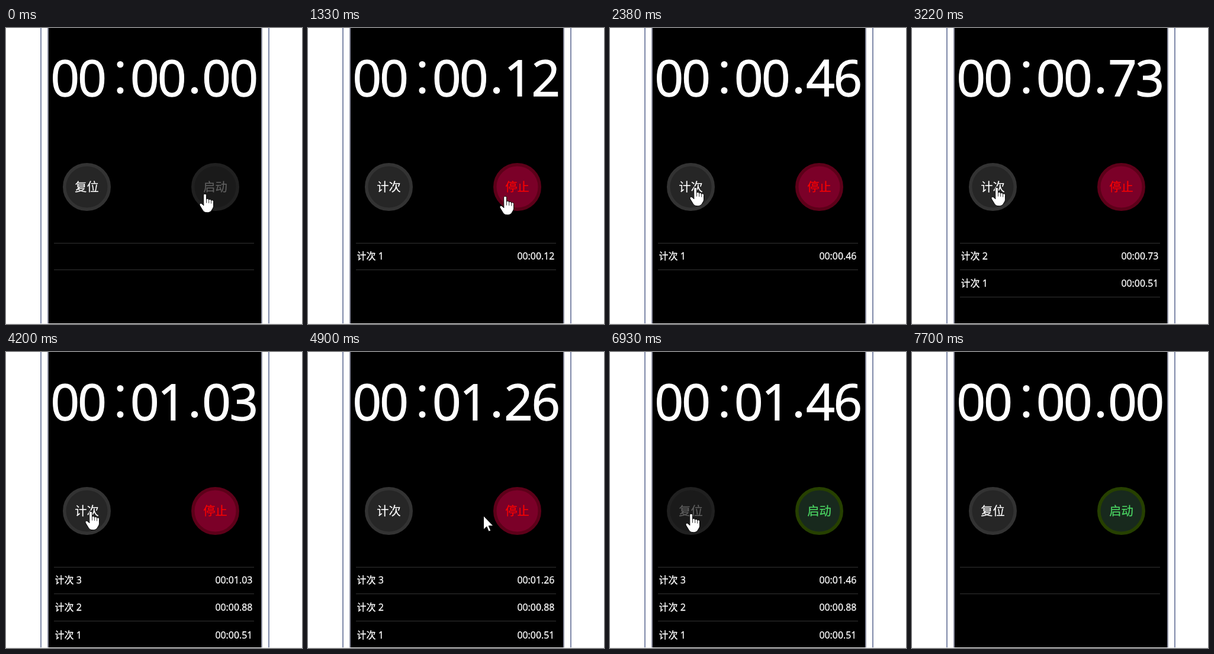
An HTML page for the animation above (8260 ms loop, 500x500 px).

```html
<!DOCTYPE html>
<html lang="zh">
<head>
<meta charset="utf-8">
<title>Stopwatch</title>
<style>
  html, body { margin: 0; width: 100%; height: 100%; overflow: hidden; background: #fff; }
  svg { display: block; width: 500px; height: 500px; }
  text {
    font-family: "Open Sans", "Noto Sans CJK SC", "Noto Sans CJK", sans-serif;
    color: #fff; fill: currentColor; stroke: currentColor; stroke-width: .35;
  }
  .digit { font-size: 85px; text-anchor: middle; stroke-width: 1.3; }
  .label { font-size: 20.3px; text-anchor: middle; stroke-width: .2; }
  .lap { font-size: 16px; }
  .time { font-size: 15.9px; text-anchor: end; }
  .rule { fill: #333; }
  .cursor { fill: #fff; stroke: #000; stroke-width: 1; stroke-linejoin: round; stroke-linecap: round; }
</style>
</head>
<body>
<svg id="stage" viewBox="0 0 500 500">
  <rect width="500" height="500" fill="#fff"/>
  <g fill="#7f89a9">
    <rect x="58" width="2" height="500"/>
    <rect x="443" width="2" height="500"/>
  </g>
  <rect x="70" width="363" height="500" fill="#8a8c9e"/>
  <rect x="72" width="359" height="500" fill="#000"/>
  <rect y="499" width="500" height="1" fill="#f0f0f0"/>
  <g fill="#fff">
    <circle cx="193" cy="61.5" r="5.5"/>
    <circle cx="193" cy="105.5" r="5.5"/>
    <circle cx="318.5" cy="105.5" r="5.7"/>
  </g>
  <rect class="rule" x="81" y="363" width="338" height="1"/>
  <rect class="rule" x="81" y="408" width="338" height="1"/>
  <g id="ui"></g>
  <g id="pointer" class="cursor">
    <g id="hand" transform="translate(-.8 -.8)">
      <path d="M-2.6 2.4C-2.6-.9 2.3-.9 2.3 2.4V9.2C3.2 7.6 6.2 7.8 6.5 10C7.6 8.5 10.2 9 10.4 11.2C11.8 9.9 14.4 10.7 14.4 13.4V20C14.4 23.5 12.2 25.6 11.2 27.6C9.6 31 6 31.5 3 31.5C-.6 31.5-2.6 29.8-4.2 27.2L-8.7 19.8C-10.3 17.2-7.6 14.8-5.2 16.8L-2.6 19.4Z"/>
      <path d="M2.3 9V15M6.5 10V15.4M10.4 11.2V16" fill="none" stroke-width=".8"/>
    </g>
    <path id="arrow" d="M0 0V23L5.3 18L8.8 26.2L12.3 24.7L8.8 16.8H16.3Z"/>
  </g>
</svg>
<script>
const LOOP = 8260, STEP = 70;
const START = 980, STOP = 5530, RESET = 7070, EXIT = 7700;
const LAPS = [[2590, 51], [3780, 88]];
const LEFT_PRESS = [[2450, 2590], [3640, 3780], [6930, 7070]];
const RIGHT_PRESS = [[0, 910], [5390, 5530]];

// time, hundredths
const CLOCK = [[960, 0], [1330, 12], [2380, 46], [3220, 73], [3360, 77], [3430, 77], [4200, 103], [5530, 146]];
// time, x, y of the fingertip
const PATH = [
  [0, 337, 281], [630, 337, 281], [910, 334, 285], [1470, 334, 285],
  [2310, 145, 270], [2450, 145, 270], [2590, 144, 270], [4270, 144, 270],
  [5180, 341, 279], [5530, 340, 278], [5950, 142, 280], [6160, 138, 274],
  [7280, 138, 274], [7700, 385, 510]
];
// fill, border, text
const LOOK = {
  grey: ["#262626", "#333333", "#ffffff"],
  red: ["#7b0028", "#5d0019", "#ff0000"],
  green: ["#18291d", "#264000", "#4cd964"],
  pressed: ["#1a1a1a", "#202020", "#606060"]
};

const ui = document.getElementById("ui");
const pointer = document.getElementById("pointer");
const hand = document.getElementById("hand");
const arrow = document.getElementById("arrow");

function add(tag, attrs) {
  const node = document.createElementNS("http://www.w3.org/2000/svg", tag);
  for (const key in attrs) node.setAttribute(key, attrs[key]);
  return ui.appendChild(node);
}
const show = (node, on) => node.setAttribute("visibility", on ? "visible" : "hidden");

const digits = [99.7, 145.5, 234.3, 280.2, 355.6, 401.9].map(x => add("text", { class: "digit", x, y: 114.7 }));

function makeButton(cx) {
  const cy = 268.5;
  return {
    cx, cy,
    disc: add("circle", { cx, cy, r: 37.75, "stroke-width": 5.5 }),
    label: add("text", { class: "label", x: cx, y: 276 })
  };
}
const left = makeButton(136.5), right = makeButton(353.5);

const rows = [0, 1, 2].map(i => {
  const y = 391 + 46.4 * i;
  return {
    name: add("text", { class: "lap", x: 82.5, y }),
    time: add("text", { class: "time", x: 416.4, y }),
    rule: add("rect", { class: "rule", x: 81, y: [408, 454, 500][i], width: 338, height: 1 })
  };
});

function sample(keys, t, ease = p => p) {
  if (t <= keys[0][0]) return keys[0].slice(1);
  const i = keys.findIndex(k => k[0] > t);
  if (i < 0) return keys[keys.length - 1].slice(1);
  const a = keys[i - 1], b = keys[i];
  const p = ease((t - a[0]) / (b[0] - a[0]));
  return a.slice(1).map((v, j) => v + (b[j + 1] - v) * p);
}
const smooth = p => p * p * (3 - 2 * p);
const within = (spans, t) => spans.some(([a, b]) => t >= a && t < b);
const pad = n => String(n).padStart(2, "0");
const format = cs => `${pad(Math.floor(cs / 6000))}:${pad(Math.floor(cs / 100) % 60)}.${pad(cs % 100)}`;

function paint(button, text, look) {
  const [fill, border, ink] = LOOK[look];
  button.disc.setAttribute("fill", fill);
  button.disc.setAttribute("stroke", border);
  button.label.style.color = ink;
  button.label.textContent = text;
}

function render(t) {
  const running = t >= START && t < STOP;
  const active = t >= START && t < RESET;
  const cs = active ? Math.round(sample(CLOCK, t)[0]) : 0;

  const chars = format(cs).replace(/\D/g, "");
  digits.forEach((d, i) => d.textContent = chars[i]);

  paint(left, running ? "计次" : "复位", within(LEFT_PRESS, t) ? "pressed" : "grey");
  paint(right, running ? "停止" : "启动",
    within(RIGHT_PRESS, t) ? "pressed" : running ? "red" : "green");

  const times = active ? [...LAPS.filter(l => t >= l[0]).map(l => l[1]), cs].reverse() : [];
  rows.forEach((row, i) => {
    const on = i < times.length;
    row.name.textContent = on ? `计次 ${times.length - i}` : "";
    row.time.textContent = on ? format(times[i]) : "";
    show(row.rule, on);
  });

  const [x, y] = sample(PATH, t, smooth);
  const over = [left, right].some(b => Math.hypot(x - b.cx, y - b.cy) < 41);
  pointer.setAttribute("transform", `translate(${x.toFixed(1)} ${y.toFixed(1)})`);
  show(hand, over && t < EXIT);
  show(arrow, !over && t < EXIT);
}

const origin = performance.now();
function tick() {
  const t = (performance.now() - origin) % LOOP;
  render(Math.floor(t / STEP) * STEP);
  requestAnimationFrame(tick);
}
tick();
</script>
</body>
</html>
```
